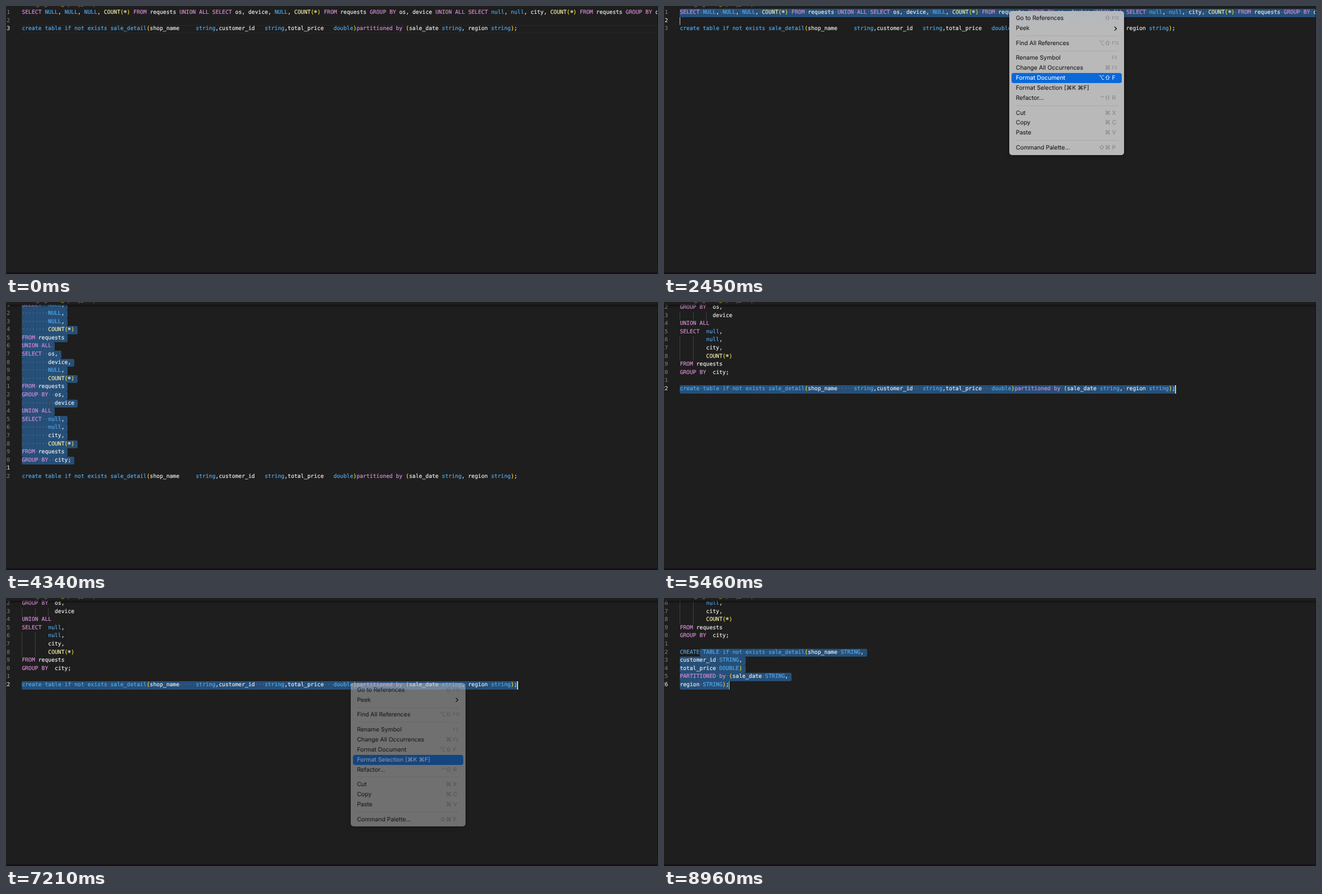
An HTML page for the animation above (9.03 s loop, 1165 px wide and 480 px high).

```html
<!DOCTYPE html>
<html lang="en">
<head>
<meta charset="utf-8">
<title>SQL formatting</title>
<style>
  html, body { margin: 0; width: 100%; height: 100%; overflow: hidden; background: #1e1e1e; }
  #stage {
    position: relative; width: 1165px; height: 480px; overflow: hidden;
    background: #1e1e1e; text-rendering: geometricPrecision;
  }
  #stage div, #stage i { position: absolute; }
  #doc {
    left: 0; width: 1165px; color: #ececec;
    font: 9.74px/14.6px "DejaVu Sans Mono", monospace; white-space: pre;
  }
  .num { left: -20px; width: 27.2px; text-align: right; color: #858585; }
  .num.on { color: #d8d8d8; }
  .row { left: 28.4px; -webkit-text-stroke: .2px; }
  .num.on { -webkit-text-stroke: .2px; }
  .kw { color: #d68bd4; }
  .ty { color: #54a9ea; }
  .fn { color: #f3efa8; }
  .br { color: #ffdc28; }
  .star { display: inline-block; transform: translateY(1.6px) scale(1.2); }
  .sel { height: 14.6px; background: #264f78; border-radius: 2.4px; }
  .dots { color: rgba(227, 228, 226, .3); }
  .guide { width: 1px; height: 14.6px; background: #404040; }
  .line { left: 28px; width: 1137px; height: 14.6px; box-sizing: border-box; border: solid #282828; border-width: 1px 0; }
  #caret { width: 1.6px; height: 14.6px; background: #c8c8c6; }

  #head {
    left: 0; top: 0; width: 1165px; height: 4.7px; overflow: hidden; background: #1e1e1e;
    color: #858585; font: 10px/12px Inter, sans-serif; white-space: pre;
  }
  #head div { top: -9px; }
  #head i { left: 98px; top: -4px; width: 6px; height: 6px; border-radius: 50%; background: #6e6a1e; }
  #shade { left: 0; top: 4.7px; width: 1165px; height: 5px; box-shadow: #000 0 5px 5px -5px inset; }
  #foot { left: 0; top: 477px; width: 1165px; height: 3px; background: #190f15; }
  #edge { left: 1163.5px; top: 0; width: 1.5px; height: 480px; background: #151315; }

  #menu {
    width: 205px; height: 257.3px; border-radius: 5px; color: #1b1b1b;
    background: linear-gradient(#b4b8be, #b9b9b9 32px);
    box-shadow: 0 2px 8px rgba(0, 0, 0, .3);
    font: 10.45px/17.84px Inter, sans-serif; white-space: pre;
  }
  .item { left: 4px; width: 197px; height: 17.84px; border-radius: 4px; }
  .item div { top: 0; color: #828282; }
  .item .name { left: 7.4px; color: inherit; -webkit-text-stroke: .1px; }
  .item .mod { right: 20.5px; }
  .item .key { left: 179px; }
  .item .small { font-size: 7.8px; }
  .item svg { position: absolute; left: 183px; top: 4.6px; }
  .item.hot { background: #0a68d9; color: #fff; }
  .item.hot div { color: #fff; }
  .rule { left: 11.5px; width: 183px; height: 1px; background: #a8a8a8; }
</style>
</head>
<body>
<div id="stage">
  <div id="doc"></div>
  <div id="caret"></div>
  <div id="shade"></div>
  <div id="head"><div style="left:39px">staging</div><i></i><div style="left:107px">query_a.sql</div></div>
  <div id="edge"></div>
  <div id="foot"></div>
  <div id="menu"></div>
</div>
<script>
const LOOP = 9030, TICK = 70;
const CHAR = 5.864, LINE = 14.6, LEFT = 28.4, TOP = 5;
const $ = id => document.getElementById(id);

const query = 'SELECT NULL, NULL, NULL, COUNT(*) FROM requests UNION ALL SELECT os, device, NULL, COUNT(*) ' +
  'FROM requests GROUP BY os, device UNION ALL SELECT null, null, city, COUNT(*) FROM requests GROUP BY city;';
const create = 'create table if not exists sale_detail(shop_name     string,customer_id   string,' +
  'total_price   double)partitioned by (sale_date string, region string);';
const pad = ' '.repeat(8);
const tidyQuery = [
  'SELECT  NULL,', pad + 'NULL,', pad + 'NULL,', pad + 'COUNT(*)', 'FROM requests', 'UNION ALL',
  'SELECT  os,', pad + 'device,', pad + 'NULL,', pad + 'COUNT(*)', 'FROM requests', 'GROUP BY  os,',
  pad + '  device', 'UNION ALL', 'SELECT  null,', pad + 'null,', pad + 'city,', pad + 'COUNT(*)',
  'FROM requests', 'GROUP BY  city;', ''
];
const raw = [query, '', create];
const half = [...tidyQuery, create];
const tidy = [
  ...tidyQuery, 'CREATE TABLE if not exists sale_detail(shop_name STRING,', 'customer_id STRING,',
  'total_price DOUBLE)', 'PARTITIONED by (sale_date STRING,', 'region STRING);'
];

// Each view: start time, text, selection anchor and caret as [line, column]
const views = [
  [0, raw, [2, 151], [2, 151]],
  [770, raw, [0, 100], [0, 100]],
  [910, raw, [0, 97], [0, 105]],
  [1120, raw, [0, 0], [1, 0]],
  [3500, half, [0, 0], [20, 0]],
  [5110, half, [21, 100], [21, 100]],
  [5250, half, [21, 95], [21, 101]],
  [5460, half, [21, 0], [21, create.length]],
  [7560, tidy, [21, 6], [25, 15]]
];
const caretOn = [[770, 1900], [2450, 3010], [3500, 3990], [4480, 4970], [5110, 6300], [6790, 7280], [7560, 8050], [8540, LOOP]];

const menus = [
  { x: 617.4, y: 9.3, open: 1400, pick: 3010, hover: [1610, 1750, 1890, 2030, 2170, 2310, 2660] },
  { x: 615.8, y: 152.1, open: 5740, pick: 7070, hover: [5880, 5950, 6090, 6160, 6300, 6370, 6510] }
];
const items = [
  ['Go to References', '⇧', 'F12'], ['Peek', '', '>'], 0,
  ['Find All References', '⌥⇧', 'F12'], 0,
  ['Rename Symbol', '', 'F2'], ['Change All Occurrences', '⌘', 'F2'], ['Format Document', '⌥⇧', 'F'],
  ['Format Selection [⌘K ⌘F]', '', ''], ['Refactor…', '⌃⇧', 'R'], 0,
  ['Cut', '⌘', 'X'], ['Copy', '⌘', 'C'], ['Paste', '⌘', 'V'], 0,
  ['Command Palette…', '⇧⌘', 'P']
];

const kinds = [
  ['kw', /^(select|from|union|all|group|by|partitioned)$/i],
  ['ty', /^(null|string|double|create|table|if|not|exists|sale_detail)$/i],
  ['fn', /^count$/i],
  ['br', /^[()]$/],
  ['star', /^\*$/]
];
const paint = text => text.replace(/\w+|[()*]/g, word => {
  const kind = kinds.find(([, rule]) => rule.test(word));
  return kind ? `<span class="${kind[0]}">${word}</span>` : word;
});
const box = (cls, style, body = '') => `<div class="${cls}" style="${style}">${body}</div>`;
const colX = col => LEFT + col * CHAR;

function renderView([, text, from, to]) {
  const empty = from[0] === to[0] && from[1] === to[1];
  let html = empty ? box('line', `top:${to[0] * LINE}px`) : '';
  text.forEach((line, i) => {
    const top = `top:${i * LINE}px`;
    const at = col => `${top};left:${colX(col)}px`;
    if (!empty && i >= from[0] && i <= to[0]) {
      const a = i === from[0] ? from[1] : 0;
      const b = i === to[0] ? to[1] : line.length + 1;
      if (b > a) html += box('sel', `${at(a)};width:${(b - a) * CHAR}px`);
      html += box('dots', at(a), line.slice(a, b).replace(/./g, c => c === ' ' ? '·' : ' '));
    }
    const indent = line.search(/\S/);
    for (let col = 0; col < indent; col += 4) html += box('guide', at(col));
    html += box(i === to[0] ? 'num on' : 'num', top, i + 1) + box('row', top, paint(line));
  });
  $('doc').innerHTML = html;
}

function buildMenu() {
  const chevron = '<svg width="6" height="9"><path d="M1 1l3.5 3.5L1 8" fill="none" stroke="currentColor" stroke-width="1.5"/></svg>';
  let y = 3.8, html = '';
  for (const item of items) {
    if (!item) {
      html += box('rule', `top:${y + 4}px`);
      y += 8.92;
      continue;
    }
    const [name, mod, key] = item;
    const end = key === '>' ? chevron : box(key.length > 1 ? 'key small' : 'key', '', key);
    html += box('item', `top:${y}px`, box('name', '', name) + box('mod', '', mod) + end);
    y += 17.84;
  }
  $('menu').innerHTML = html;
}

function drawMenu(t) {
  const menu = menus.find(m => t >= m.open && t < m.pick + 280);
  const el = $('menu');
  el.style.display = menu ? 'block' : 'none';
  if (!menu) return;
  const since = t - menu.pick;
  el.style.left = menu.x + 'px';
  el.style.top = menu.y + 'px';
  el.style.opacity = since < 140 ? 1 : since < 210 ? .53 : .07;
  const blink = since >= 0 && since < 70;
  const hot = blink ? -1 : menu.hover.filter(h => h <= t).length - 1;
  el.querySelectorAll('.item').forEach((row, i) => row.classList.toggle('hot', i === hot));
}

function scrollAt(t) {
  if (t >= 7560) return 221;
  const p = Math.min(1, Math.max(0, (t - 4270) / 630));
  return 162.6 * p * p * (3 - 2 * p);
}

let shown, last = -1;
function draw(t) {
  const view = views.filter(v => v[0] <= t).pop();
  if (view !== shown) renderView(shown = view);
  const scroll = scrollAt(t), [row, col] = view[3];
  $('doc').style.top = TOP - scroll + 'px';
  $('shade').style.opacity = scroll > 0 ? 1 : 0;
  const caret = $('caret').style;
  caret.left = colX(col) - .8 + 'px';
  caret.top = TOP + row * LINE - scroll + 'px';
  caret.opacity = caretOn.some(([a, b]) => t >= a && t < b) ? 1 : 0;
  drawMenu(t);
}

const start = performance.now();
function frame() {
  const t = Math.floor((performance.now() - start) % LOOP / TICK) * TICK;
  if (t !== last) draw(last = t);
  requestAnimationFrame(frame);
}
buildMenu();
frame();
</script>
</body>
</html>
```
